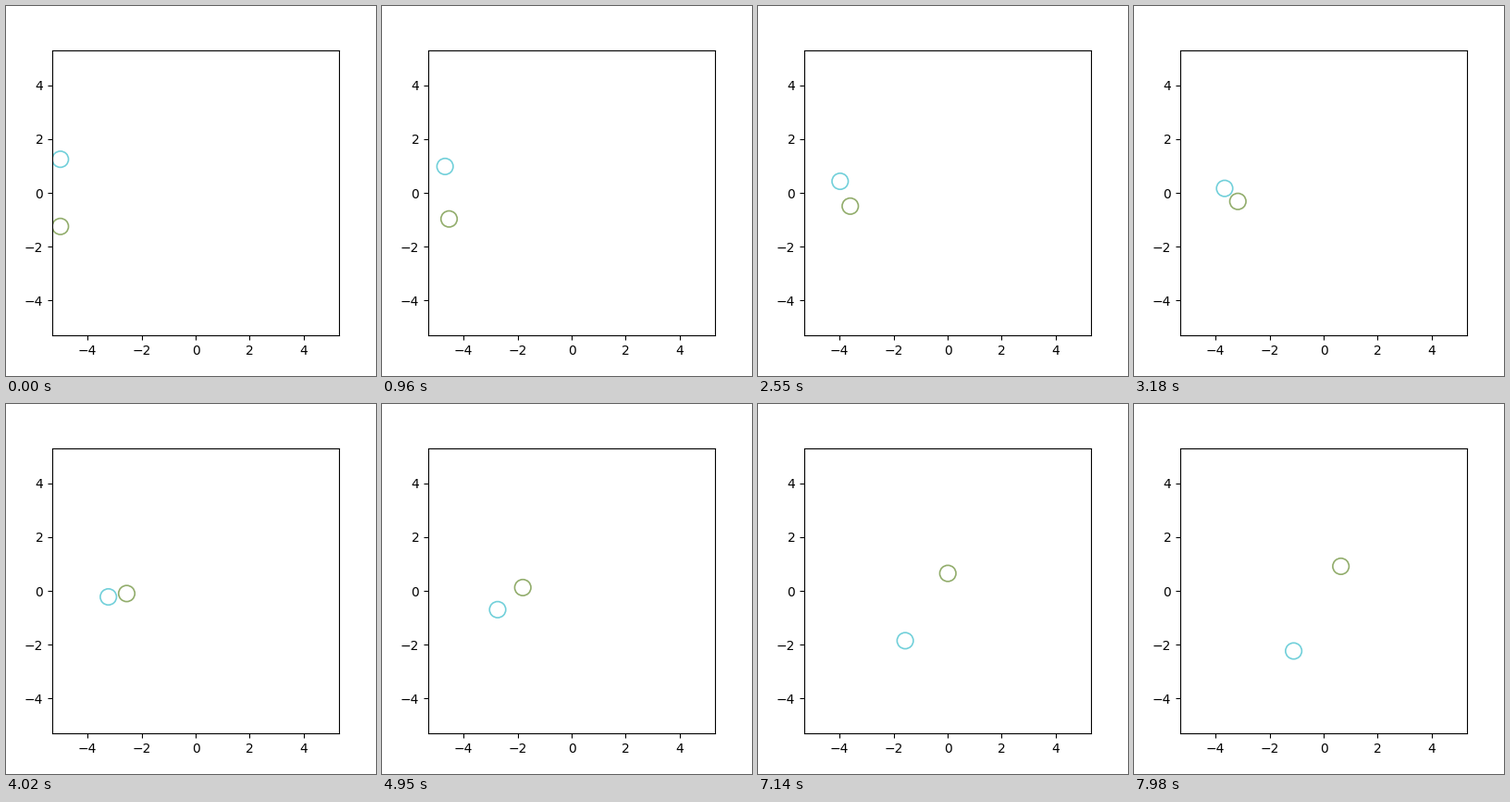
A matplotlib script that plays this animation: 400x400 px, repeating every 8 s.

```python
import numpy as np
import matplotlib.pyplot as plt
from matplotlib.animation import FuncAnimation
from matplotlib.patches import Circle

FRAMES = 267
LOOP_MS = 8000
LIMIT = 5.3
RADIUS = 0.3

# Each particle glides through a few key points, evenly spaced in time
CYAN_KEYS = [(-5, 1.25), (-4.238, 0.641), (-3.241, -0.21),
             (-2.186, -1.253), (-1.108, -2.237)]
GREEN_KEYS = [(-5, -1.25), (-3.949, -0.658), (-2.571, -0.107),
              (-0.941, 0.36), (0.638, 0.913)]


def glide(keys):
    """Return the coefficients of the polynomial path through the keys."""
    return np.polyfit(np.linspace(0, 1, len(keys)), keys, len(keys) - 1)


fig, ax = plt.subplots(figsize=(4, 4), dpi=100)
ax.set_xlim(-LIMIT, LIMIT)
ax.set_ylim(-LIMIT, LIMIT)

particles = []
for keys, color in ((CYAN_KEYS, "#72d0da"), (GREEN_KEYS, "#92ad6c")):
    ring = Circle(keys[0], RADIUS, fill=False, edgecolor=color, linewidth=1.2)
    ax.add_patch(ring)
    particles.append((ring, glide(keys)))


def update(step):
    u = step / (FRAMES - 1)
    for ring, path in particles:
        ring.center = tuple(np.polyval(path, u))
    return [ring for ring, _ in particles]


anim = FuncAnimation(fig, update, frames=FRAMES, interval=LOOP_MS / FRAMES,
                     repeat=True, repeat_delay=0)
plt.show()
```
